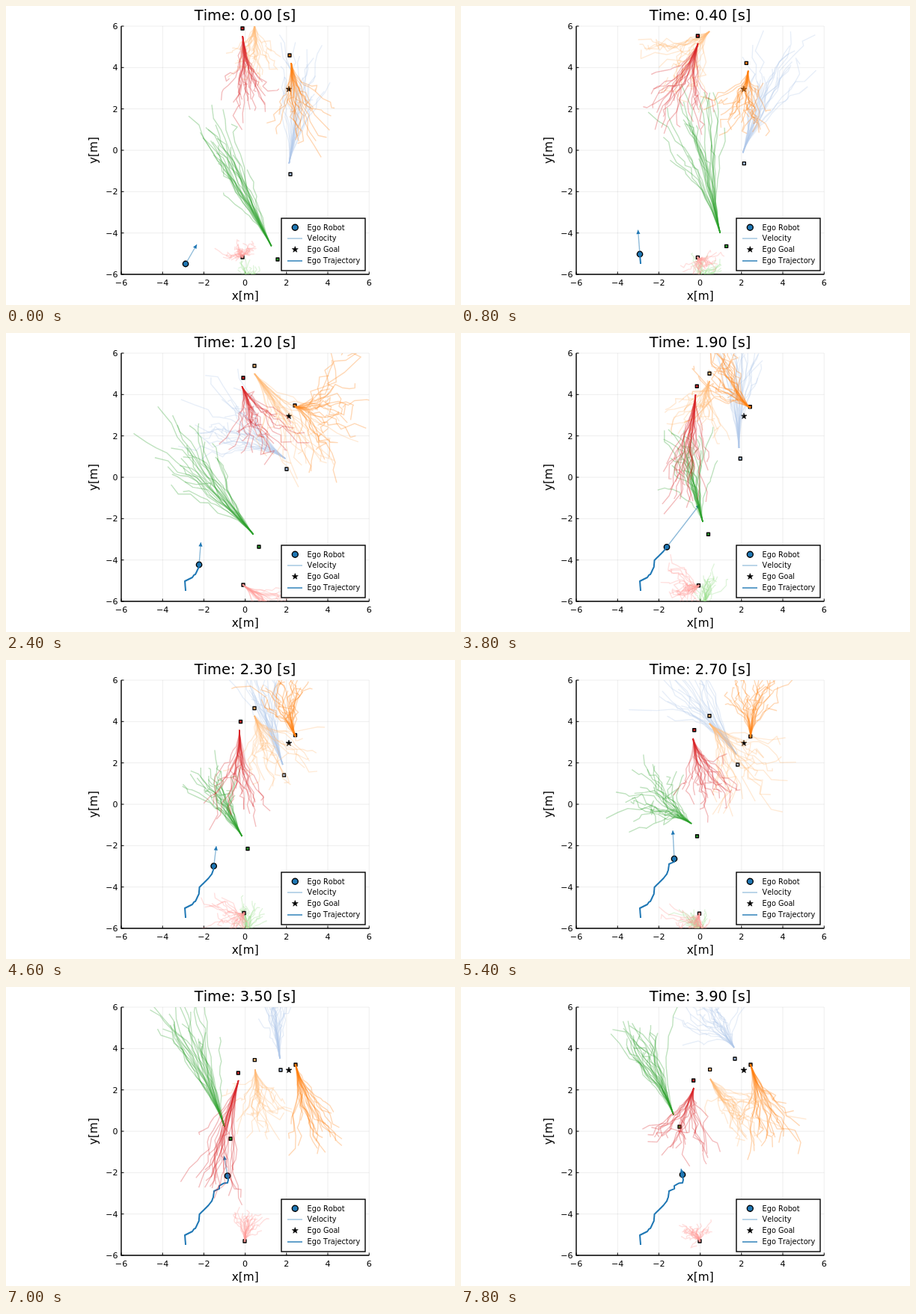
An HTML page for the animation above (8000 ms loop, 600 by 400 pixels).

```html
<!DOCTYPE html>
<html lang="en">
<head>
<meta charset="utf-8">
<title>Trajectory prediction</title>
<style>
html, body { margin: 0; width: 100%; height: 100%; overflow: hidden; background: #fff; }
svg { display: block; width: 600px; height: 400px; font-family: "DejaVu Sans", sans-serif; font-kerning: none; }
</style>
</head>
<body>
<svg id="stage" viewBox="0 0 600 400"></svg>
<script>
const STEP_MS = 200, STEPS = 40, STEPS_PER_EPOCH = 4, EPOCHS = 10, SAMPLES = 24, HORIZON = 12;
const BLUE = '#1f77b4';
const BOX = { left: 154, right: 485.3, top: 27, bottom: 359 };

// Agents walk through `path` and each epoch aim a fan of futures at `aim`
const PATH_EPOCHS = [0, 3, 7, 10], AIM_EPOCHS = [0, 2, 3, 4, 6, 7, 9];
const AGENTS = [
  { color: '#aec7e8', spread: 16, path: [[380, 225], [375, 182], [368, 126], [365, 81]],
    aim: [[402, 75], [437, 65], [275, 95], [365, 5], [288, 15], [384, 0], [325, 20]] },
  { color: '#ff7f0e', spread: 19, path: [[379, 66], [386, 97], [387, 104], [387, 104]],
    aim: [[386, 165], [370, 148], [452, 116], [325, 50], [388, 28], [402, 200], [415, 195]] },
  { color: '#ffbb78', spread: 19, path: [[332, 14], [332, 44], [332, 85], [333, 123]],
    aim: [[335, 85], [215, 88], [410, 155], [316, 125], [410, 167], [312, 160], [375, 195]] },
  { color: '#2ca02c', spread: 17, path: [[363, 339], [338, 286], [308, 219], [284, 171]],
    aim: [[285, 182], [325, 118], [220, 142], [298, 150], [240, 172], [248, 18], [240, 48]] },
  { color: '#98df8a', spread: 11, path: [[322, 372], [322, 372], [322, 372], [322, 372]],
    aim: [[330, 354], [331, 338], [322, 385], [335, 326], [310, 340], [322, 385], [322, 385]] },
  { color: '#d62728', spread: 16, path: [[316, 30], [317, 60], [310, 105], [311, 135]],
    aim: [[322, 125], [257, 163], [348, 145], [303, 203], [330, 192], [262, 285], [288, 213]] },
  { color: '#ff9896', spread: 11, path: [[316, 336], [317, 337], [319, 340], [319, 340]],
    aim: [[312, 326], [334, 370], [365, 372], [290, 348], [305, 366], [332, 300], [313, 320]] }
];

// Turning points of the ego robot and the steps at which it reaches them
const EGO_STEPS = [0, 4, 6, 7, 8, 11, 14, 18, 19, 21, 24, 26, 27, 30, 31, 33, 36, 37, 38, 39];
const EGO_POINTS = [
  [240, 345], [239, 332], [249, 327], [251.3, 323.6], [253, 323], [257.8, 313], [258.5, 304],
  [270.6, 292], [275, 286.3], [277, 281], [278, 273], [285.2, 269.8], [285, 266], [291.1, 262.5],
  [296, 262], [297, 258], [295.6, 250], [294.5, 253.4], [296.2, 251.8], [296, 251]
];

const stage = document.getElementById('stage');

function add(parent, tag, attrs, text) {
  const el = document.createElementNS(stage.namespaceURI, tag);
  for (const key in attrs) el.setAttribute(key, attrs[key]);
  if (text) el.textContent = text;
  parent.append(el);
  return el;
}

const label = (text, x, y, size, anchor = 'middle', extra = {}) =>
  add(stage, 'text', { x, y, 'font-size': size, 'text-anchor': anchor, ...extra }, text);

const line = (parent, d, stroke, width, opacity = 1) =>
  add(parent, 'path', { d, stroke, 'stroke-width': width, fill: 'none', opacity });

const toPath = points => 'M' + points.map(p => p[0].toFixed(1) + ' ' + p[1].toFixed(1)).join('L');

function star(parent, x, y, r) {
  const points = Array.from({ length: 10 }, (_, i) => {
    const a = i * Math.PI / 5 - Math.PI / 2, d = i % 2 ? r * 0.4 : r;
    return [x + d * Math.cos(a), y + d * Math.sin(a)];
  });
  add(parent, 'path', { d: toPath(points) + 'Z', stroke: '#000', 'stroke-width': 0.6 });
}

const robot = (parent, x, y, r) =>
  add(parent, 'circle', { cx: x, cy: y, r, fill: BLUE, stroke: '#000', 'stroke-width': 1.4 });

function seeded(seed) {
  return () => {
    seed = (seed + 0x6D2B79F5) | 0;
    let t = Math.imul(seed ^ (seed >>> 15), 1 | seed);
    t ^= t + Math.imul(t ^ (t >>> 7), 61 | t);
    return ((t ^ (t >>> 14)) >>> 0) / 4294967296;
  };
}

function interpolate(times, points, t) {
  let i = 0;
  while (i < times.length - 2 && t > times[i + 1]) i++;
  const f = (t - times[i]) / (times[i + 1] - times[i]);
  return points[i].map((v, k) => v + (points[i + 1][k] - v) * f);
}

// One sampled future: a tight beam that fans out, with noise that grows along the way
function samplePath([x0, y0], dx, dy, spread, random) {
  const swing = () => random() * 2 - 1;
  const length = Math.hypot(dx, dy), reach = 0.65 + 0.6 * random(), u = swing();
  const side = 2.1 * spread * u * Math.sqrt(Math.abs(u));
  const wobble = spread * (random() < 0.1 ? 0.75 : 0.38);
  let wx = 0, wy = 0;
  return toPath(Array.from({ length: HORIZON + 1 }, (_, k) => {
    const t = k / HORIZON, along = reach * t, across = side * t ** 1.6 / length;
    wx += wobble * t ** 1.3 * swing();
    wy += wobble * t ** 1.3 * swing();
    return [x0 + dx * along - dy * across + wx, y0 + dy * along + dx * across + wy];
  }));
}

function drawAgent(group, { color, spread, path, aim }, epoch, random) {
  const [x, y] = interpolate(PATH_EPOCHS, path, epoch);
  const start = interpolate(PATH_EPOCHS, path, epoch + 1);
  const end = interpolate(AIM_EPOCHS, aim, epoch);
  const vx = start[0] - x, vy = start[1] - y, dx = end[0] - start[0], dy = end[1] - start[1];
  // futures that turn away from the present heading are less certain
  const turn = Math.abs(vx * dy - vy * dx) / (Math.hypot(vx, vy) * Math.hypot(dx, dy) || 1);
  add(group, 'rect', { x: x - 2, y: y - 2, width: 4, height: 4, fill: color, stroke: '#000', 'stroke-width': 1.3 });
  for (let i = 0; i < SAMPLES; i++)
    line(group, samplePath(start, dx, dy, spread * (1 + turn), random), color, 1.4, 0.3);
}

// Axes
const xAt = v => 319.65 + v * 27.6, yAt = v => 193 - v * 27.67;
for (let v = -6; v <= 6; v += 2) {
  const name = String(v).replace('-', '\u2212');
  line(stage, `M${xAt(v)} ${BOX.top}V${BOX.bottom}M${BOX.left} ${yAt(v)}H${BOX.right}`, '#000', 0.7, 0.1);
  line(stage, `M${xAt(v)} ${BOX.bottom}v-3.5M${BOX.left} ${yAt(v)}h3.5`, '#000', 1);
  label(name, xAt(v), 374, 11.1);
  label(name, 149.5, yAt(v) + 4, 11.1, 'end');
}
line(stage, `M${BOX.left} ${BOX.top}V${BOX.bottom}H${BOX.right}`, '#000', 1.4);
label('x[m]', 319.7, 392.6, 15.3);
label('y[m]', 0, 0, 15.3, 'middle', { transform: 'translate(122 193) rotate(-90)' });
const title = label('Time: 0.00 [s]', 319.6, 19.3, 19.44);

// Plot content
const clip = add(add(stage, 'defs'), 'clipPath', { id: 'plot' });
add(clip, 'rect', { x: BOX.left, y: BOX.top, width: BOX.right - BOX.left, height: BOX.bottom - BOX.top });
const plot = add(stage, 'g', { 'clip-path': 'url(#plot)', 'stroke-linejoin': 'round' });

const dot = robot(plot, 0, 0, 3.7);
const shaft = line(plot, '', BLUE, 1.4, 0.5);
const head = add(plot, 'path', { d: 'M0 0L-5.5 -2.6V2.6Z', fill: BLUE });
star(plot, 378, 111.3, 4.2);
const trail = line(plot, '', BLUE, 2);

const epochs = Array.from({ length: EPOCHS }, (_, epoch) => {
  const group = add(plot, 'g');
  AGENTS.forEach((agent, id) => drawAgent(group, agent, epoch, seeded(id * 101 + epoch * 17 + 5)));
  return group;
});

// Legend
add(stage, 'rect', { x: 368, y: 284, width: 112, height: 70, fill: '#fff', stroke: '#000', 'stroke-width': 1.4 });
['Ego Robot', 'Velocity', 'Ego Goal', 'Ego Trajectory'].forEach((text, i) =>
  label(text, 402.6, 299.5 + i * 14.8, 9.72, 'start'));
robot(stage, 386.3, 296.3, 4);
line(stage, 'M376 311H396', BLUE, 1.2, 0.5);
star(stage, 386.3, 325.8, 4.2);
line(stage, 'M376 341H396', BLUE, 1.4);

const egoAt = step => interpolate(EGO_STEPS, EGO_POINTS, step);

function draw(step) {
  const [x, y] = egoAt(step);
  const [px, py] = step ? egoAt(step - 1) : [x - 1.5, y + 2.6];
  const tipX = x + (x - px) * 10, tipY = y + (y - py) * 10;
  const angle = Math.atan2(y - py, x - px) * 180 / Math.PI;
  title.textContent = `Time: ${(step / 10).toFixed(2)} [s]`;
  dot.setAttribute('cx', x);
  dot.setAttribute('cy', y);
  shaft.setAttribute('d', toPath([[x, y], [tipX, tipY]]));
  head.setAttribute('transform', `translate(${tipX} ${tipY}) rotate(${angle})`);
  trail.setAttribute('d', toPath(Array.from({ length: step + 1 }, (_, i) => egoAt(i))));
  const current = Math.floor(step / STEPS_PER_EPOCH);
  epochs.forEach((group, i) => group.setAttribute('display', i === current ? 'inline' : 'none'));
}

const begin = performance.now();
let shown = -1;
function tick() {
  const step = Math.floor((performance.now() - begin) / STEP_MS) % STEPS;
  if (step !== shown) draw(shown = step);
  requestAnimationFrame(tick);
}
tick();
</script>
</body>
</html>
```
